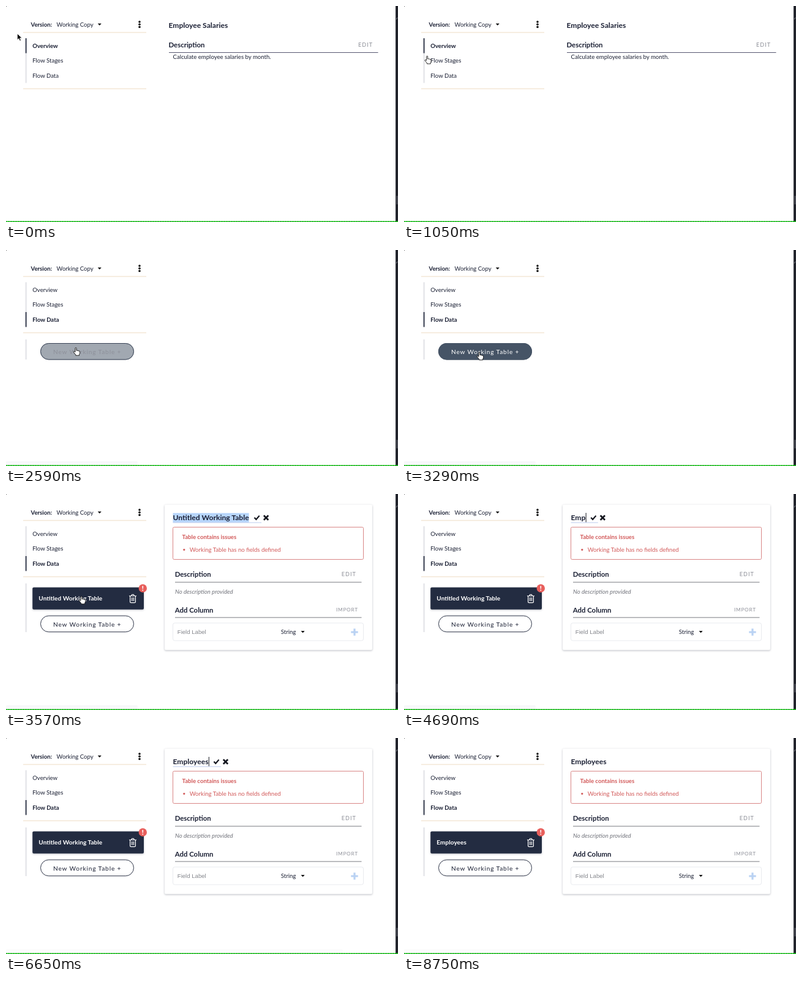
Animation of 640x355 px, one loop 8820 ms. Source, as an HTML page:

```html
<!DOCTYPE html>
<html lang="en">
<head>
<meta charset="utf-8">
<title>Working table demo</title>
<style>
  html, body { margin: 0; width: 100%; height: 100%; overflow: hidden; background: #fff; }
  svg { display: block; width: 100vw; height: 100vh; }
  text { font: 9.6px Lato, sans-serif; fill: #1b2034; white-space: pre; }
  .bold { font-weight: 700; }
  .title { font-size: 12.1px; font-weight: 700; }
  .heading { font-size: 11.4px; font-weight: 700; }
  .action { font-size: 9px; letter-spacing: 1.05px; fill: #8d8f98; }
  .action.small { font-size: 8.3px; letter-spacing: .7px; }
  .pill text { font-size: 10.2px; letter-spacing: .83px; }
  .issue, .issue text { fill: #d25a5a; }
  .note { font-style: italic; fill: #71737b; }
  .field { font-family: "Liberation Sans", Arial, sans-serif; fill: #85878d; }
  .card { font-size: 10.15px; font-weight: 700; fill: #fff; }
  .divider { stroke: #f3e7d6; stroke-width: 1.5; }
  .rule { stroke: #77787f; }
  .rail { fill: #dcdde2; }
  .shadow { filter: drop-shadow(0 1px 1.5px rgba(20, 28, 50, .3)); }
  .stroke { fill: none; stroke: #15171f; }
</style>
</head>
<body>
<svg viewBox="0 0 640 355">
  <defs>
    <pattern id="dashes" width="4" height="2" patternUnits="userSpaceOnUse">
      <rect width="4" height="2" fill="#18d018"/>
      <rect width="1" height="2" fill="#0b6a12"/>
    </pattern>
  </defs>

  <!-- window edges -->
  <rect id="status" y="347" height="8" rx="2" fill="#f8f8fa"/>
  <rect x="636" width="4" height="354" fill="#23252d"/>
  <path d="M637 22l2-3" stroke="#85878e"/>
  <rect x="637" y="312" width="3" height="14" fill="#454750"/>
  <rect y="353.5" width="640" height="1.5" fill="url(#dashes)"/>
  <rect width="1" height="1" fill="#555"/>

  <!-- sidebar -->
  <text class="bold" x="40.5" y="33.8">Version:</text>
  <text x="82.5" y="33.8">Working Copy</text>
  <path d="M149.8 28.8h6l-3 3.2z"/>
  <circle cx="218" cy="26" r="1.75"/>
  <circle cx="218" cy="30.2" r="1.75"/>
  <circle cx="218" cy="34.4" r="1.75"/>
  <path class="divider" d="M28 43.5H229M28 136H229"/>
  <rect class="rail" x="31.8" y="53" width="1.7" height="73.5"/>
  <rect id="marker" x="31.8" width="1.7" height="24.5" fill="#20273b"/>
  <text id="navOverview" x="43.2" y="68.8">Overview</text>
  <text x="43.2" y="93.2">Flow Stages</text>
  <text id="navData" x="43.2" y="117.6">Flow Data</text>

  <g id="overview">
    <text class="title" x="265.5" y="36.3">Employee Salaries</text>
    <text class="heading" x="265.5" y="67.8">Description</text>
    <text class="action" x="575" y="67">EDIT</text>
    <path d="M266 76.5H607.5" stroke="#55566f"/>
    <text x="272.5" y="87.3">Calculate employee salaries by month.</text>
  </g>

  <g id="tables">
    <rect id="tableRail" class="rail" x="31.8" y="147" width="1.7"/>
    <g id="button" class="pill">
      <rect x="56.5" y="153.5" width="152" height="26.5" rx="13.25" fill="#fff" stroke="#2a3144"/>
      <text x="77" y="170.9">New Working Table +</text>
      <g id="hover">
        <rect x="56" y="153" width="153" height="27.5" rx="13.75" fill="#465466"/>
        <text x="77" y="170.9" style="fill:#fff">New Working Table +</text>
      </g>
    </g>
  </g>

  <g id="editor">
    <rect class="shadow" x="43.3" y="153.5" width="181.7" height="36.3" rx="2" fill="#232c41"/>
    <text id="cardName" class="card" x="53.3" y="174.9"></text>
    <g fill="none" stroke="#fff" stroke-width="1.2">
      <path d="M201 167.5H213M204.6 167.3l1-2h2.8l1 2M202.6 168v9.2q0 1.4 1.4 1.4h6q1.4 0 1.4-1.4V168"/>
      <path d="M205.2 170v6M207 170v6M208.8 170v6" stroke-width=".9"/>
    </g>
    <circle cx="223.3" cy="155" r="6.7" fill="#e85f5c"/>
    <path d="M223.3 151v4.8M223.3 157.2v1.7" stroke="#fff" stroke-width="1.5"/>

    <rect class="shadow" x="259" y="17.5" width="339" height="239" rx="2" fill="#fff"/>
    <rect id="selection" x="272.5" y="31.3" height="15.5" fill="#b7d5fb"/>
    <path id="underline" stroke="#bccbee"/>
    <text id="name" class="title" x="272.5" y="42.8"></text>
    <path id="caret" d="M.8 31V46.3" class="stroke"/>
    <g id="confirm" class="stroke">
      <path d="M8.9 38.8l2.9 3 5.3-6.2" stroke-width="2.2"/>
      <path d="M24.3 35.3l7.4 7.4M31.7 35.3l-7.4 7.4" stroke-width="2.7"/>
    </g>

    <rect x="272.5" y="54.5" width="311" height="53" rx="2" fill="#fff" stroke="#d98686"/>
    <g class="issue">
      <text class="bold" x="287.5" y="74.4">Table contains issues</text>
      <circle cx="290.8" cy="91.6" r="1.6"/>
      <text x="299.7" y="94.6">Working Table has no fields defined</text>
    </g>
    <text class="heading" x="275.7" y="136.2">Description</text>
    <text class="action" x="547.8" y="135.2">EDIT</text>
    <text class="note" x="276" y="164.2">No description provided</text>
    <text class="heading" x="275.7" y="195">Add Column</text>
    <text class="action small" x="539" y="193.4">IMPORT</text>
    <path class="rule" d="M276 145H580.5M276 203H580.5"/>
    <rect x="272.5" y="212" width="311" height="29" rx="3" fill="#fff" stroke="#e9ebef"/>
    <text class="field" x="279.8" y="229.8">Field Label</text>
    <text x="448.8" y="229.8">String</text>
    <path d="M481.6 225h6l-3 3.2z"/>
    <path d="M563.3 227h11.4M569 221.3v11.4" stroke="#b9d2f3" stroke-width="3.2"/>
  </g>

  <g id="cursor" stroke-linejoin="round">
    <path id="arrow" d="M0 0V10.2L2.4 8l1.7 3.8 1.8-.8L4.2 7.3h3.3z" fill="#000" stroke="#fff" stroke-width=".7"/>
    <path id="hand" d="M-1 1Q-1 0 0 0T1 1V4.7Q2.2 4 3 5 4.2 4.4 4.8 5.5 6.6 5 6.6 6.8V8.6Q6.6 10 5.6 11.2V12.8H-.2V11.6L-3.4 7.8Q-4.2 6.5-3 6.2-2.2 6-1 7.4z"
      fill="#fff" stroke="#111" stroke-width=".9"/>
  </g>
</svg>
<script>
const LOOP = 8820, STEP = 70;
const OPEN_DATA = 1820, CREATE = 3360, COMMIT = 7140, CARET_OFF = 6860;
const UNTITLED = "Untitled Working Table", NAME = "Employees";
const KEY_TIMES = [3850, 4410, 4690, 4970, 5460, 5600, 5950, 6370, 6580];
const NAME_X = 272.5;

const ui = Object.fromEntries([...document.querySelectorAll("[id]")].map(el => [el.id, el]));
const show = (el, on) => { el.style.display = on ? "" : "none"; };
const place = (el, x, y) => el.setAttribute("transform", `translate(${x} ${y})`);
const clamp = v => Math.min(1, Math.max(0, v));
const progress = (t, from, to) => clamp((t - from) / (to - from));
const ease = p => p * p * (3 - 2 * p);

function drawCursor(t) {
  const first = ease(progress(t, 700, 1330));
  const second = ease(progress(t, 2100, 2730));
  const x = 18.5 + 33 * first + 71.5 * second;
  const y = 45.5 + 63 * first + 59.5 * second;
  const overLink = (y > 78 && y < 126 && x > 34) || y > 153;
  place(ui.cursor, x, y);
  show(ui.arrow, !overLink);
  show(ui.hand, overLink);
  show(ui.cursor, t < KEY_TIMES[0]);
}

function drawSidebar(t) {
  const onData = t >= OPEN_DATA, created = t >= CREATE;
  ui.navOverview.classList.toggle("bold", !onData);
  ui.navData.classList.toggle("bold", onData);
  ui.marker.setAttribute("y", onData ? 102 : 53);
  show(ui.overview, !onData);
  show(ui.tables, onData);
  show(ui.status, onData);
  ui.status.setAttribute("width", t < 4970 ? 215 : 550);
  ui.status.setAttribute("opacity", t < 4970 ? 1 : .5);
  ui.tableRail.setAttribute("height", created ? 80 : 33);
  place(ui.button, 0, created ? 46.7 : 0);
  ui.hover.setAttribute("opacity", progress(t, 2450, 2730) * (1 - progress(t, CREATE - STEP, CREATE + STEP)));
}

function drawEditor(t) {
  show(ui.editor, t >= CREATE);
  if (t < CREATE) return;
  const typed = KEY_TIMES.filter(time => t >= time).length;
  const editing = t < COMMIT;
  ui.name.textContent = typed ? NAME.slice(0, typed) : UNTITLED;
  ui.cardName.textContent = editing ? UNTITLED : NAME;
  const width = ui.name.getComputedTextLength(), end = NAME_X + width;
  ui.selection.setAttribute("width", width);
  ui.underline.setAttribute("d", `M${NAME_X} 47H${end + 20.5}`);
  place(ui.caret, end, 0);
  place(ui.confirm, end, 0);
  show(ui.selection, !typed);
  show(ui.underline, editing);
  show(ui.confirm, editing);
  show(ui.caret, typed && t < CARET_OFF);
}

function draw(now) {
  const t = Math.floor((now % LOOP) / STEP) * STEP;
  drawSidebar(t);
  drawEditor(t);
  drawCursor(t);
}

const start = performance.now();
function tick() {
  draw(performance.now() - start);
  requestAnimationFrame(tick);
}
tick();
</script>
</body>
</html>
```
